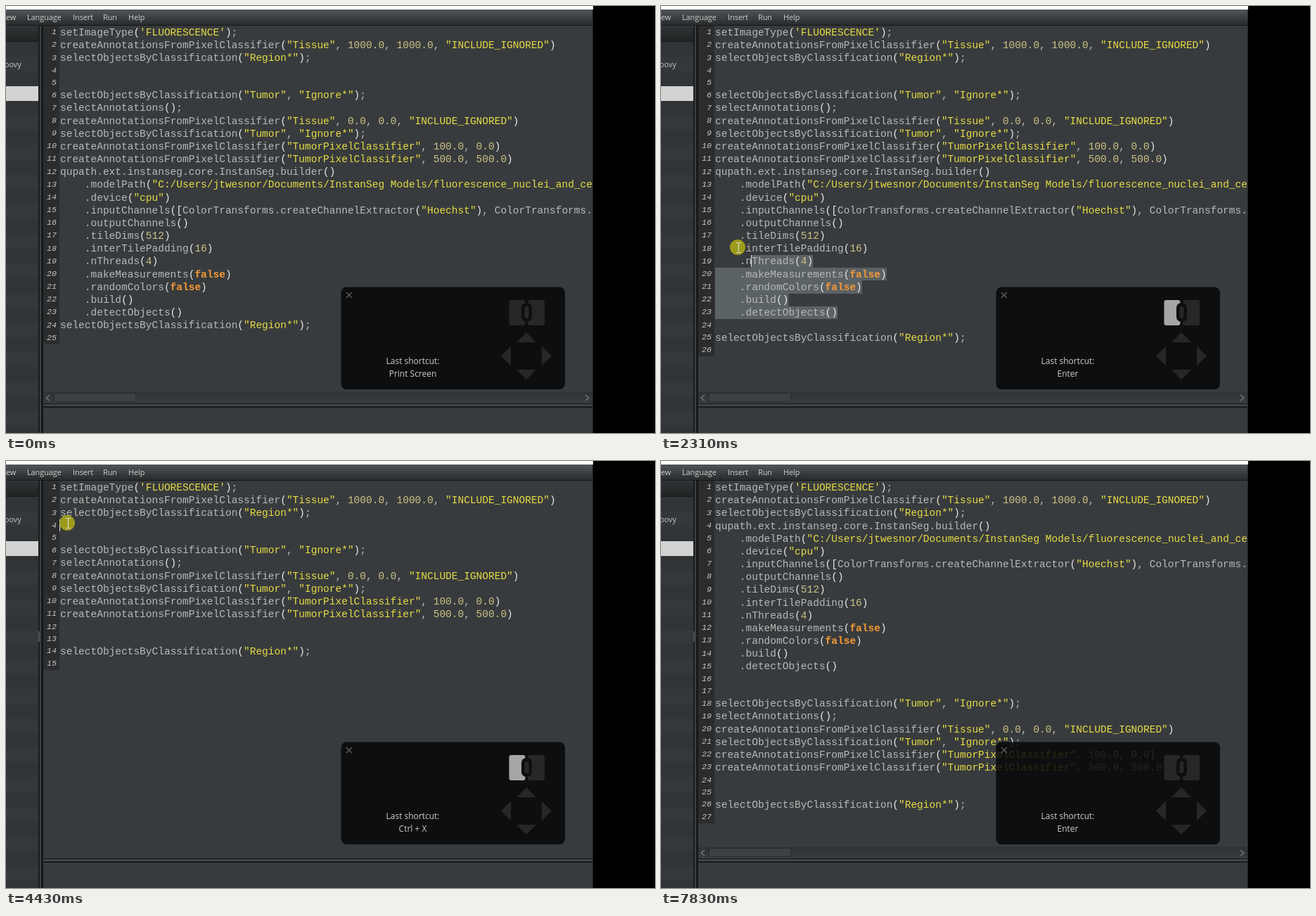
Recreate the animation shown at these times as an HTML page with a canvas. Size 923x607 px, loop 7.9 s.

```html
<!DOCTYPE html>
<html lang="en">
<head>
<meta charset="utf-8">
<title>Script editor</title>
<style>
  html, body { margin: 0; width: 100%; height: 100%; overflow: hidden; background: #000; }
  canvas { display: block; }
</style>
</head>
<body>
<canvas id="stage" width="923" height="607"></canvas>
<script>
const ctx = document.getElementById('stage').getContext('2d');
const LOOP = 7900;
const MONO = '"Courier New", "Liberation Mono", monospace';
const SANS = '"Open Sans", "Noto Sans", sans-serif';
const LEFT = 77, TOP = 28.7, CHAR = 8.7, ROW = 18.17, EMPTY_ROW = 17.35;

const head = [
  "setImageType('FLUORESCENCE');",
  'createAnnotationsFromPixelClassifier("Tissue", 1000.0, 1000.0, "INCLUDE_IGNORED")',
  'selectObjectsByClassification("Region*");'
];
const middle = [
  'selectObjectsByClassification("Tumor", "Ignore*");',
  'selectAnnotations();',
  'createAnnotationsFromPixelClassifier("Tissue", 0.0, 0.0, "INCLUDE_IGNORED")',
  'selectObjectsByClassification("Tumor", "Ignore*");',
  'createAnnotationsFromPixelClassifier("TumorPixelClassifier", 100.0, 0.0)',
  'createAnnotationsFromPixelClassifier("TumorPixelClassifier", 500.0, 500.0)'
];
const builder = [
  'qupath.ext.instanseg.core.InstanSeg.builder()',
  '    .modelPath("C:/Users/jtwesnor/Documents/InstanSeg Models/fluorescence_nuclei_and_cells")',
  '    .device("cpu")',
  '    .inputChannels([ColorTransforms.createChannelExtractor("Hoechst"), ColorTransforms.createChannelExtractor("CD3")])',
  '    .outputChannels()',
  '    .tileDims(512)',
  '    .interTilePadding(16)',
  '    .nThreads(4)',
  '    .makeMeasurements(false)',
  '    .randomColors(false)',
  '    .build()',
  '    .detectObjects()'
];
const tail = ['selectObjectsByClassification("Region*");', ''];

// Each track holds [start time, value]; a value lasts until the next start.
const CUT = 3740, PASTE = 5640;
const documents = [
  [0, [...head, '', '', ...middle, ...builder, ...tail]],
  [1550, [...head, '', '', ...middle, ...builder, '', ...tail]],
  [CUT, [...head, '', '', ...middle, '', '', ...tail]],
  [PASTE, [...head, ...builder, '', ...middle, '', '', ...tail]],
  [6610, [...head, ...builder, '', '', ...middle, '', '', ...tail]]
];
const popups = [[0, ''], [1480, 'Enter'], [1720, ''], [3460, 'Ctrl'], [CUT, 'Ctrl + X'], [3990, ''],
  [5370, 'Ctrl'], [PASTE, 'Ctrl + V'], [5950, ''], [6560, 'Enter'], [6680, '']];
const shortcuts = [[0, 'Print Screen'], [1720, 'Enter'], [3990, 'Ctrl + X'], [5950, 'Ctrl + V'], [6680, 'Enter']];
const buttonDown = [[0, false], [2090, true], [3100, false], [4290, true], [4540, false]];
// Caret as [line index, column].
const carets = [[0, null], [710, [22, 20]], [1210, null], [1550, [23, 0]], [2020, null],
  [4360, [3, 0]], [4890, null], [5390, [3, 0]], [PASTE, [14, 20]], [6210, null],
  [6610, [15, 0]], [7090, null], [7570, [15, 0]], [7830, null]];
const pointerPath = [
  [70, 650, 570], [400, 450, 490], [810, 340, 435], [1950, 340, 435], [2090, 262, 437],
  [2160, 200, 411], [2240, 128, 363], [2310, 110, 343], [2590, 38, 243], [2700, 31, 233],
  [2800, 34, 237], [3390, 34, 237], [3530, 64, 200], [3800, 80, 100], [4000, 90, 73],
  [4160, 88, 87], [5910, 88, 92], [6250, 150, 98], [6470, 211, 137], [6680, 306, 315],
  [6750, 306, 317], [7020, 306, 317], [7300, 480, 450], [7570, 663, 571]
];

const at = (track, t) => track.findLast(([start]) => t >= start)[1];

function pointerAt(t) {
  const next = pointerPath.findIndex(p => p[0] > t);
  if (next <= 0) return (next ? pointerPath.at(-1) : pointerPath[0]).slice(1);
  const [t0, x0, y0] = pointerPath[next - 1], [t1, x1, y1] = pointerPath[next];
  const k = (t - t0) / (t1 - t0);
  return [x0 + (x1 - x0) * k, y0 + (y1 - y0) * k];
}

function rect(x, y, w, h, fill) {
  ctx.fillStyle = fill;
  ctx.fillRect(x, y, w, h);
}

function rounded(x, y, w, h, r, fill) {
  ctx.fillStyle = fill;
  ctx.beginPath();
  ctx.roundRect(x, y, w, h, r);
  ctx.fill();
}

function text(str, x, y, font, fill, align = 'left') {
  ctx.font = font;
  ctx.fillStyle = fill;
  ctx.textAlign = align;
  ctx.fillText(str, x, Math.round(y));
}

function line(points, color, width = 1) {
  ctx.strokeStyle = color;
  ctx.lineWidth = width;
  ctx.beginPath();
  points.forEach(([x, y]) => ctx.lineTo(x, y));
  ctx.stroke();
}

function polygon(points, fill) {
  ctx.fillStyle = fill;
  ctx.beginPath();
  points.forEach(([x, y]) => ctx.lineTo(x, y));
  ctx.fill();
}

function shade(y0, y1, ...colors) {
  const g = ctx.createLinearGradient(0, y0, 0, y1);
  colors.forEach((c, i) => g.addColorStop(i / (colors.length - 1), c));
  return g;
}

function drawWindow(t) {
  rect(0, 0, 923, 607, '#000');
  rect(0, 0, 835, 607, '#383b3d');
  rect(0, 0, 835, 5, '#fff');
  rect(0, 5, 835, 22, shade(5, 27, '#515557', '#3c4042', '#292b2c'));
  rect(0, 27, 835, 1, '#151617');
  [['ew', 0], ['Language', 30], ['Insert', 95], ['Run', 138], ['Help', 174]]
    .forEach(([label, x]) => text(label, x, 20, '10.8px ' + SANS, '#cfcfcf'));

  // Script list
  for (let i = 0; i < 27; i++) rect(0, 51 + i * 21, 46, 21, i % 2 ? '#35383a' : '#313436');
  rect(0, 29, 46, 21, shade(29, 50, '#303335', '#212324'));
  rect(0, 50, 46, 1, '#191a1b');
  rect(0, 114, 46, 21, '#d2d2d2');
  text('oovy', -2, 87, '10.8px ' + SANS, '#c4c4c4');

  // Divider
  rect(46, 28, 2, 579, '#1a1b1c');
  rect(48, 28, 2, 579, '#3c4042');
  rect(50, 28, 3, 579, '#17181a');
  if (t >= 3390) rect(46, 242, 2, 15, '#4a4e50');

  // Lower pane
  rect(53, 565, 782, 1, '#151617');
  rect(53, 566, 782, 3, '#414547');
  rect(53, 569, 782, 2, '#17181a');
  rect(834, 5, 1, 602, '#202223');
}

function drawScrollbar() {
  rect(53, 549, 781, 15, shade(549, 564, '#2f3234', '#393c3e'));
  ctx.fillStyle = '#3d4143';
  ctx.strokeStyle = '#292b2d';
  ctx.lineWidth = 1;
  ctx.beginPath();
  ctx.roundRect(68.5, 550.5, 116, 12, 2);
  ctx.fill();
  ctx.stroke();
  line([[62, 553], [57, 557], [62, 561]], '#777b7d', 1.3);
  line([[824, 553], [829, 557], [824, 561]], '#777b7d', 1.3);
}

function drawCode(str, y) {
  const tokens = str.matchAll(/(["'].*?["'])|(\b\d+(?:\.\d+)?)|(\bfalse\b)|([()[\]]+)|[a-zA-Z]+|./g);
  for (const m of tokens) {
    const [token, string, number, keyword, bracket] = m;
    const color = string ? '#e6dc46' : number ? '#cbc186' : keyword ? '#f79a35' : bracket ? '#e8e8e8' : '#b9b9b9';
    text(token, LEFT + m.index * CHAR, y, (keyword ? 'bold ' : '') + '14.5px ' + MONO, color);
  }
}

function selectionHead(t, lines, tops) {
  const [x, y] = pointerAt(Math.min(t - 70, 2800));
  const row = Math.max(11, tops.findLastIndex(top => top <= y));
  const col = Math.round((x - LEFT) / CHAR);
  return [row, Math.max(0, Math.min(lines[row].length, col))];
}

function drawEditor(t) {
  const lines = at(documents, t);
  const tops = [TOP];
  lines.forEach((s, i) => tops.push(tops[i] + (s ? ROW : EMPTY_ROW)));

  ctx.save();
  ctx.beginPath();
  ctx.rect(53, 28, 781, 537);
  ctx.clip();
  rect(53, 28, 23, tops[lines.length] - 28, '#2a2c2e');

  let caret = at(carets, t);
  if (t >= 2120 && t < CUT) {
    const [row, col] = selectionHead(t, lines, tops);
    for (let i = row; i <= 22; i++) {
      const start = i === row ? col : 0;
      const y = Math.round(tops[i]);
      rect(LEFT + start * CHAR, y, (lines[i].length - start) * CHAR, Math.round(tops[i + 1]) - y, '#5b6265');
    }
    if (t < 3060) caret = [row, col];
  }

  lines.forEach((s, i) => {
    text(i + 1, 72, tops[i] + 11.6, 'italic 11.6px ' + MONO, '#c6c6c6', 'right');
    drawCode(s, tops[i] + 13.3);
  });
  if (caret) rect(Math.round(LEFT + caret[1] * CHAR) - 1, Math.round(tops[caret[0]]), 1, 17, '#e4e4e4');
  if (t < CUT || t >= PASTE) drawScrollbar();
  ctx.restore();
}

function drawKeyPanel(t) {
  const dim = '#272727', dark = '#0e0f10';
  rounded(476.5, 399.5, 318.5, 145.5, 8, 'rgba(5,6,7,.83)');
  line([[484, 407], [492, 415]], '#606060', 1.2);
  line([[492, 407], [484, 415]], '#606060', 1.2);
  text(at(popups, t), 578.5, 430, '20px ' + SANS, '#f4f4f4', 'center');
  text('Last shortcut:', 578.5, 509, '12px ' + SANS, '#cdcdcd', 'center');
  text(at(shortcuts, t), 578.5, 527, '12px ' + SANS, '#cdcdcd', 'center');

  rounded(715.5, 418, 23, 36, 3, at(buttonDown, t) ? '#a6a6a6' : dim);
  rounded(742, 418, 24, 36, 3, dim);
  rounded(733, 422, 15, 27, 7, dark);
  rounded(737.5, 427, 6, 17, 3, dim);

  for (let i = 0; i < 4; i++) {
    const reach = i % 2 ? 36 : 33.5;
    ctx.save();
    ctx.translate(740, 497.5);
    ctx.rotate(i * Math.PI / 2);
    polygon([[0, -reach], [14, 14 - reach], [-14, 14 - reach]], dim);
    ctx.restore();
  }
}

function drawPointer(t) {
  if (t < 70 || t >= 7830) return;
  const [x, y] = pointerAt(t).map(Math.round);
  if (at(buttonDown, t)) {
    ctx.fillStyle = 'rgba(172,168,24,.88)';
    ctx.beginPath();
    ctx.arc(x - 1, y, 11, 0, 7);
    ctx.fill();
  }
  const inEditor = x > 53 && y < 565;
  if (inEditor) {
    rect(x, y - 6, 1, 13, '#e0e0e0');
    for (const dy of [-7, 7]) {
      rect(x - 3, y + dy, 3, 1, '#e0e0e0');
      rect(x + 1, y + dy, 3, 1, '#e0e0e0');
    }
  } else {
    const arrow = [[0, 0], [0, 15], [4, 12], [6, 17], [8, 16], [6, 11], [11, 11], [0, 0]]
      .map(([dx, dy]) => [x + dx, y + dy]);
    polygon(arrow, '#fff');
    line(arrow, '#000');
  }
}

function frame() {
  const t = performance.now() % LOOP;
  drawWindow(t);
  drawEditor(t);
  drawKeyPanel(t);
  drawPointer(t);
  requestAnimationFrame(frame);
}
frame();
</script>
</body>
</html>
```
